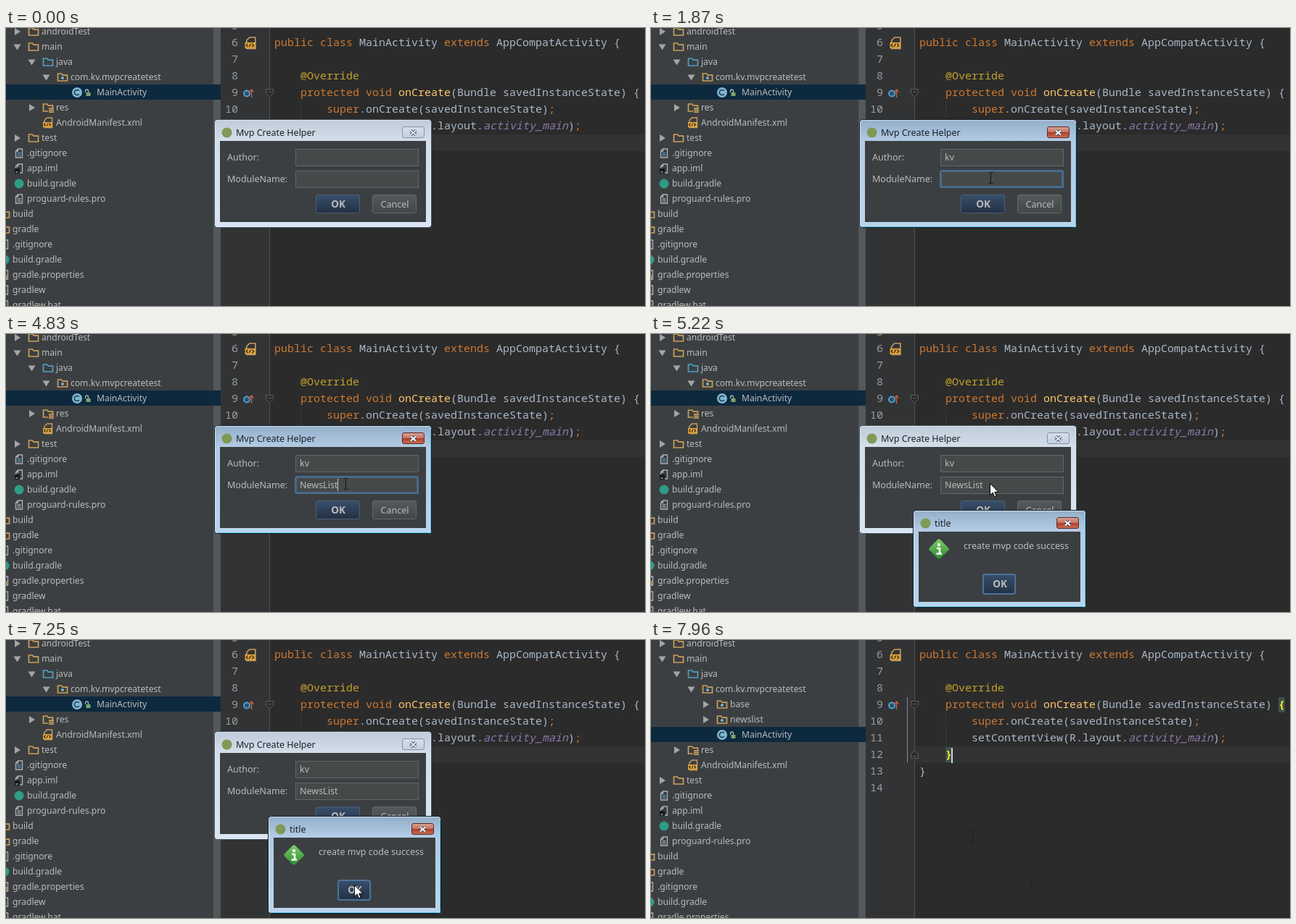
Write an HTML page that moves like this. It is 881x384 px and loops after 8000 ms.

```html
<!DOCTYPE html>
<html lang="en">
<head>
<meta charset="utf-8">
<title>Create helper dialog</title>
<style>
  html, body { margin: 0; width: 100%; height: 100%; overflow: hidden; background: #2b2b2b; }
  svg { display: block; width: 881px; height: 384px; }
  text { white-space: pre; fill: #bbb; font: 12.1px "Noto Sans", "Open Sans", sans-serif; }
  .ui text { font-size: 12.5px; }
  .ui .bold { font-weight: 700; font-size: 13.5px; }
  .code text { font: 15px "Noto Sans Mono", "DejaVu Sans Mono", monospace; fill: #a9b7c6; }
  .code .num { fill: #9a9c9e; }
  .code .brace { fill: #ffef28; font-weight: 700; }
  .kw { fill: #cc7832; }
  .note { fill: #c0a02c; }
  .fn { fill: #ffc66d; }
  .res { fill: #8c78aa; font-style: italic; }
</style>
</head>
<body>
<svg id="stage" viewBox="0 0 881 384">
  <defs>
    <linearGradient id="glassOn" x2="0" y2="1">
      <stop offset="0" stop-color="#93aeca"/><stop offset=".2" stop-color="#b3cbe4"/><stop offset="1" stop-color="#bad5ee"/>
    </linearGradient>
    <linearGradient id="glassOff" x2="0" y2="1">
      <stop offset="0" stop-color="#bfcbd8"/><stop offset=".2" stop-color="#d4dfeb"/><stop offset="1" stop-color="#d9e5f2"/>
    </linearGradient>
    <linearGradient id="closeOn" x2="0" y2="1">
      <stop offset="0" stop-color="#dba395"/><stop offset=".48" stop-color="#c77463"/><stop offset=".52" stop-color="#ae3c28"/><stop offset="1" stop-color="#cb7158"/>
    </linearGradient>
    <linearGradient id="closeOff" x2="0" y2="1">
      <stop offset="0" stop-color="#d5dfea"/><stop offset="1" stop-color="#c3d0de"/>
    </linearGradient>
    <linearGradient id="btnMain" x2="0" y2="1">
      <stop offset="0" stop-color="#384f6b"/><stop offset="1" stop-color="#233143"/>
    </linearGradient>
    <linearGradient id="btn" x2="0" y2="1">
      <stop offset="0" stop-color="#555a5c"/><stop offset="1" stop-color="#414648"/>
    </linearGradient>
    <linearGradient id="green" x2="1" y2="1">
      <stop offset="0" stop-color="#7fce6c"/><stop offset="1" stop-color="#2b8a32"/>
    </linearGradient>

    <path id="right" d="M-3.5-5 4.5 0-3.5 5z" fill="#a3a5a6"/>
    <path id="down" d="M-5-3.5H5L0 4.5z" fill="#a3a5a6"/>
    <path id="folder" d="M-6.5-5h5l1.7 2.2h6.3v7.8h-13z" stroke-width="1.7"/>
    <g id="dir" fill="none" stroke="#c9a05c"><use href="#folder"/></g>
    <g id="src" fill="none" stroke="#4f9fc4"><use href="#folder"/></g>
    <g id="pkg"><use href="#dir"/><circle cy="1" r="2" fill="#7fb3d0"/></g>
    <g id="resdir"><use href="#dir"/><path d="M0 0h8v7H0z" fill="#3c3f41"/><path d="M1 1h7M1 3.5h7M1 6h7" stroke="#e0b262" stroke-width="1.5"/></g>
    <path id="sheet" d="M-1.500-6H4.500V6H-4.500V-3zV-3H-4.500" fill="none" stroke="#a9b3ba" stroke-width="1.300"/>
    <g id="page"><use href="#sheet"/><path d="M-2.500-.5h5M-2.500 1.500h5M-2.500 3.500h5" stroke="#a9b3ba"/></g>
    <g id="git"><use href="#sheet"/><path d="M-2.500-.5h5M-2.500 1.500h5M-2.500 3.500h5" stroke="#4f9fc4"/></g>
    <g id="iml"><use href="#sheet"/><path d="M-6 0h7v7h-7z" fill="#17191a"/><path d="M-4.500 5h3" stroke="#ddd"/></g>
    <g id="props"><use href="#sheet"/><path d="M-2.500 5V1M0 5v-6M2.500 5V0" stroke="#d79a3e" stroke-width="1.800"/></g>
    <circle id="gradle" r="6.500" fill="#2f9c86"/>
    <g id="xml">
      <path d="M-1.500-7H5.500V6.500H-5V-3.500z" fill="none" stroke="#c9a05c" stroke-width="1.400"/>
      <path d="M-7-1H5V6H-7z" fill="#e0a63c"/>
      <path d="M-3.500.5-5.500 2.500l2 2M1.500.5l2 2-2 2M0 .5-2 4.500" fill="none" stroke="#3a2b14" stroke-width="1.200"/>
    </g>
    <g id="cls">
      <circle r="7" fill="#7fb5d3"/><path d="M2.800-2.200A3.600 3.600 0 1 0 2.800 2.200" fill="none" stroke="#24404f" stroke-width="1.500"/>
      <path d="M12.500 0h6v5h-6z" fill="#7ba66d"/><path d="M11.500 0v-2a2 2 0 0 1 4 0v2" fill="none" stroke="#aab5ad" stroke-width="1.300"/>
    </g>
  </defs>
  <g id="tree"></g>
  <g id="editor" class="code"></g>
  <g id="main" class="ui"></g>
  <g id="popup" class="ui"></g>
  <g stroke="#111" fill="none">
    <path id="ghost" d="M523.500 334v12" opacity=".4"/>
    <path id="beam" d="M-3-7.500h2.500M.5-7.500H3M0-7v14M-3 7.500h2.500M.5 7.500H3"/>
  </g>
  <path id="arrow" d="M0 0V16L3.700 12.600 6.200 18.400 8.600 17.400 6.200 11.700H11.300z" fill="#fff" stroke="#000"/>
</svg>
<script>
const LOOP = 8000;
const $ = id => document.getElementById(id);
const use = (id, x, y) => `<use href="#${id}" x="${x}" y="${y}"/>`;
const text = (x, y, s, attr = '') => `<text x="${x}" y="${y}" ${attr}>${s}</text>`;
const rect = (x, y, w, h, fill, attr = '') =>
  `<rect x="${x}" y="${y}" width="${w}" height="${h}" fill="${fill}" ${attr}/>`;

// Project tree: [label, text x, icon, arrow]
const ROW = 21;
const row = ([label, x, icon, arrow], i) => {
  const y = 5 + i * ROW;
  const iconX = icon === 'cls' ? x - 27 : x - 11;
  return (arrow ? use(arrow, x - 33.5, y) : '') + use(icon, iconX, y) + text(x, y + 4, label);
};
const rows = (list, from) => list.map((r, i) => row(r, i + from)).join('');
const top4 = [
  ['androidTest', 49, 'dir', 'right'], ['main', 49, 'dir', 'down'],
  ['java', 69, 'src', 'down'], ['com.kv.mvpcreatetest', 89, 'pkg', 'down']
];
const created = [['base', 109, 'pkg', 'right'], ['newslist', 109, 'pkg', 'right']];
const rest = [
  ['MainActivity', 125, 'cls'], ['res', 69, 'resdir', 'right'], ['AndroidManifest.xml', 69, 'xml'],
  ['test', 49, 'dir', 'right'], ['.gitignore', 29, 'git'], ['app.iml', 29, 'iml'],
  ['build.gradle', 29, 'gradle'], ['proguard-rules.pro', 29, 'page'], ['build', 9, 'dir'],
  ['gradle', 9, 'dir'], ['.gitignore', 9, 'git'], ['build.gradle', 9, 'gradle'],
  ['gradle.properties', 9, 'props'], ['gradlew', 9, 'page'], ['gradlew.bat', 9, 'page']
];
$('tree').innerHTML = rect(0, 0, 296, 384, '#3c3f41') + rect(286, 0, 10, 384, '#55585a') +
  rows(top4, 0) + `<g id="created">${rows(created, 4)}</g>` +
  `<g id="rest">${rect(0, 78, 296, ROW, '#0d293e')}${rows(rest, 4)}</g>`;

// Editor
const lineY = n => 20 + (n - 6) * 23;
const span = (cls, s) => `<tspan class="${cls}">${s}</tspan>`;
const semi = span('kw', ';');
const lines = {
  6: [0, span('kw', 'public class ') + 'MainActivity ' + span('kw', 'extends ') + 'AppCompatActivity {'],
  8: [4, span('note', '@Override')],
  9: [4, span('kw', 'protected void ') + span('fn', 'onCreate') + '(Bundle savedInstanceState) {'],
  10: [8, span('kw', 'super') + '.onCreate(savedInstanceState)' + semi],
  11: [8, 'setContentView(R.layout.' + span('res', 'activity_main') + ')' + semi],
  12: [4, '}'],
  13: [0, '}']
};
const col = n => 370 + n * 9;
let code = rect(296, 0, 585, 384, '#2b2b2b') + rect(296, 0, 68, 384, '#313335') +
  rect(364, 147, 517, 23, '#323232') + rect(363, 0, 1, 384, '#4f5152') +
  '<path d="M406.500 101v46" stroke="#424445" stroke-dasharray="2 2"/>';
for (let n = 5; n <= 14; n++) code += text(n < 10 ? 311 : 302, lineY(n) + 5, n, 'class="num"');
for (const n in lines) code += text(col(lines[n][0]), lineY(n) + 5, lines[n][1]);
code += `<g transform="translate(337.500 21) scale(1.150)">${use('xml', 0, 0)}</g>
  <circle cx="332" cy="90.500" r="4" fill="#2f4f66" stroke="#4f9fd0" stroke-width="2"/>
  <path d="M338.500 96v-10M335.500 88.500l3-3.500 3 3.500" fill="none" stroke="#c8623c" stroke-width="1.400"/>
  <g fill="#2b2b2b" stroke="#5d5f60"><path d="M358.500 84.500h10v6l-5 4.500-5-4.500zM361 88.500h5"/>
  <path d="M358.500 163.500h10v-6l-5-4.500-5 4.500zM361 160.500h5"/></g>
  <g id="focus">${rect(353, 79, 1, 90, '#8a8c8d')}
  ${rect(865, 79, 9, 21, '#3b514d')}${rect(406, 148, 9, 21, '#3b514d')}
  ${text(865, 94, '{', 'class="brace"')}${text(406, 163, '}', 'class="brace"')}
  ${rect(414, 149, 2, 21, '#d0d0d0')}</g>`;
$('editor').innerHTML = code;

// Windows
const glass = (x, y, w, h, on) => {
  const mode = on ? 'On' : 'Off', cx = x + w - 25.5, cy = y + 18.5;
  const edge = on ? '#14202b' : '#4c5763', mark = on ? '#fff' : '#e8eef5';
  const cross = `M${cx - 3.5} ${cy - 3}l7 6m0-6l-7 6`;
  return rect(x + .5, y + .5, w - 1, h - 1, `url(#glass${mode})`, `rx="4" stroke="${edge}"`) +
    rect(x + 1.5, y + 1.5, w - 3, h - 3, 'none', `rx="3" stroke="#e6f0fa" stroke-opacity=".7"`) +
    (on ? `<path d="M${x + w - 1.500} ${y + 6}V${y + h - 1.500}H${x + 4}" fill="none" stroke="#5fd3ee"/>` : '') +
    rect(cx - 15, cy - 8, 30, 15, `url(#close${mode})`, `rx="2.500" stroke="${on ? '#5a2a26' : '#8592a2'}"`) +
    `<path d="${cross}" stroke="#4a5060" stroke-width="4"/><path d="${cross}" stroke="${mark}" stroke-width="2"/>`;
};
const body = (x, y, w, h, title) =>
  `<circle cx="${x + 17.500}" cy="${y + 18.500}" r="7" fill="#7f9a55"/>` +
  text(x + 30, y + 23, title, 'style="fill:#1c2126"') +
  rect(x + 8, y + 30, w - 16, h - 38, '#3c3f41');
const field = (id, y) =>
  rect(399.5, y + .5, 169, 23, '#45494a', 'stroke="#646667"') +
  `<g id="${id}Ring">${rect(399, y, 169, 23, 'none', 'rx="2.500" stroke="#466d94" stroke-width="2"')}
  ${rect(400.5, y + 1.5, 166, 20, 'none', 'rx="1" stroke="#5781a8" stroke-opacity=".5"')}</g>` +
  text(405, y + 16, '', `id="${id}"`) +
  rect(405, y + 3, 1, 17, '#c8c8c8', `id="${id}Caret"`);
const button = (x, y, w, h, label, tx, main) =>
  rect(x + .5, y + .5, w - 1, h - 1, main ? 'url(#btnMain)' : 'url(#btn)', `rx="2.500" stroke="${main ? '#4a6079' : '#66696b'}"`) +
  text(tx, y + h / 2 + 4.5, label, `text-anchor="middle"${main ? ' class="bold"' : ''}`);

const mainBox = [287, 126, 300, 150], popupBox = [361, 243, 239, 135];
$('main').innerHTML = glass(...mainBox, false) + `<g id="active">${glass(...mainBox, true)}</g>` +
  body(...mainBox, 'Mvp Create Helper') +
  text(305, 183, 'Author:') + text(305, 213, 'ModuleName:') +
  field('author', 167) + field('module', 197) +
  button(427, 230, 61, 26, 'OK', 458, true) + button(505, 230, 61, 26, 'Cancel', 536);
$('popup').innerHTML = glass(...popupBox, true) + body(...popupBox, 'title') +
  rect(-10.5, -10.5, 21, 21, 'url(#green)', 'rx="3" transform="translate(397 297) rotate(45)"') +
  rect(395, 289, 4, 4, '#fff', 'rx="1.500"') + '<path d="M394 296h4v7M393.500 303.500h7.500" fill="none" stroke="#fff" stroke-width="2.500"/>' +
  text(431, 297, 'create mvp code success') +
  button(457, 331, 46, 29, 'OK', 481, true) +
  rect(458, 332, 44, 27, 'none', 'rx="3" stroke="#4a749c" stroke-width="2"');

// Pointer: [time, shape, x, y], held until the next entry
const path = [
  [0, '', 0, 0], [150, 'arrow', 461.5, 167.5], [620, 'arrow', 464.5, 168.5], [700, 'arrow', 473.5, 171.5],
  [780, 'beam', 486.5, 180], [860, 'beam', 496.5, 183], [930, 'beam', 502.5, 184], [1010, 'beam', 504.5, 184],
  [1170, 'beam', 492.5, 192], [1250, 'beam', 472.5, 205], [1410, 'beam', 468.5, 207],
  [5220, 'arrow', 467.5, 206.5], [6460, 'arrow', 466.5, 193.5], [6610, 'arrow', 463.5, 193.5],
  [6690, 'arrow', 470.5, 201.5], [6770, 'arrow', 488.5, 222.5], [6850, 'arrow', 508.5, 252.5],
  [6930, 'arrow', 520.5, 282.5], [7010, 'arrow', 516.5, 312.5], [7090, 'arrow', 502.5, 333.5],
  [7170, 'arrow', 487.5, 343.5], [7250, 'arrow', 480.5, 338.5], [7560, 'arrow', 500.5, 339.5],
  [7640, 'beam', 523.5, 340], [7720, 'beam', 500.5, 322], [7800, 'beam', 466.5, 292], [7880, 'beam', 443.5, 272]
];
const keys = { author: [930, 1170], module: [2420, 2730, 2890, 3200, 4210, 4440, 4600, 4830] };
const words = { author: 'kv', module: 'NewsList' };

const show = (id, on) => { $(id).style.visibility = on ? 'visible' : 'hidden'; };
const within = (t, a, b) => t >= a && t < b;

function type(id, t, focused, caret) {
  const el = $(id), s = words[id].slice(0, keys[id].filter(k => k <= t).length);
  if (el.textContent !== s) el.textContent = s;
  $(id + 'Caret').setAttribute('x', 405 + (s ? Math.round(el.getComputedTextLength()) : 0));
  show(id + 'Ring', focused);
  show(id + 'Caret', caret);
}

function render(t) {
  const steps = Math.floor((t - 70) / 80) + 1;
  $('active').style.opacity = within(t, 70, 5220) ? Math.min(1, steps / 4) : 0;
  $('main').style.opacity = t < 7560 ? 1 : t < 7640 ? .5 : 0;
  $('popup').style.opacity = t < 5220 ? 0 : t < 7480 ? 1 : t < 7560 ? .5 : 0;

  type('author', t, within(t, 150, 1410), within(t, 150, 620) || within(t, 930, 1410));
  type('module', t, within(t, 1410, 5220),
    within(t, 1410, 1870) || within(t, 2420, 3660) || within(t, 4210, 5220));

  const updated = t >= 7720, closed = t >= 7640;
  show('created', updated);
  $('rest').setAttribute('transform', `translate(0 ${updated ? 2 * ROW : 0})`);
  show('focus', closed);
  show('ghost', updated);
  $('beam').style.opacity = closed ? .5 : 1;

  const [, shape, x, y] = path.filter(p => p[0] <= t).pop();
  for (const id of ['arrow', 'beam']) {
    show(id, id === shape);
    $(id).setAttribute('transform', `translate(${x} ${y})`);
  }
}

const start = performance.now();
function tick() {
  render((performance.now() - start) % LOOP);
  requestAnimationFrame(tick);
}
tick();
</script>
</body>
</html>
```
